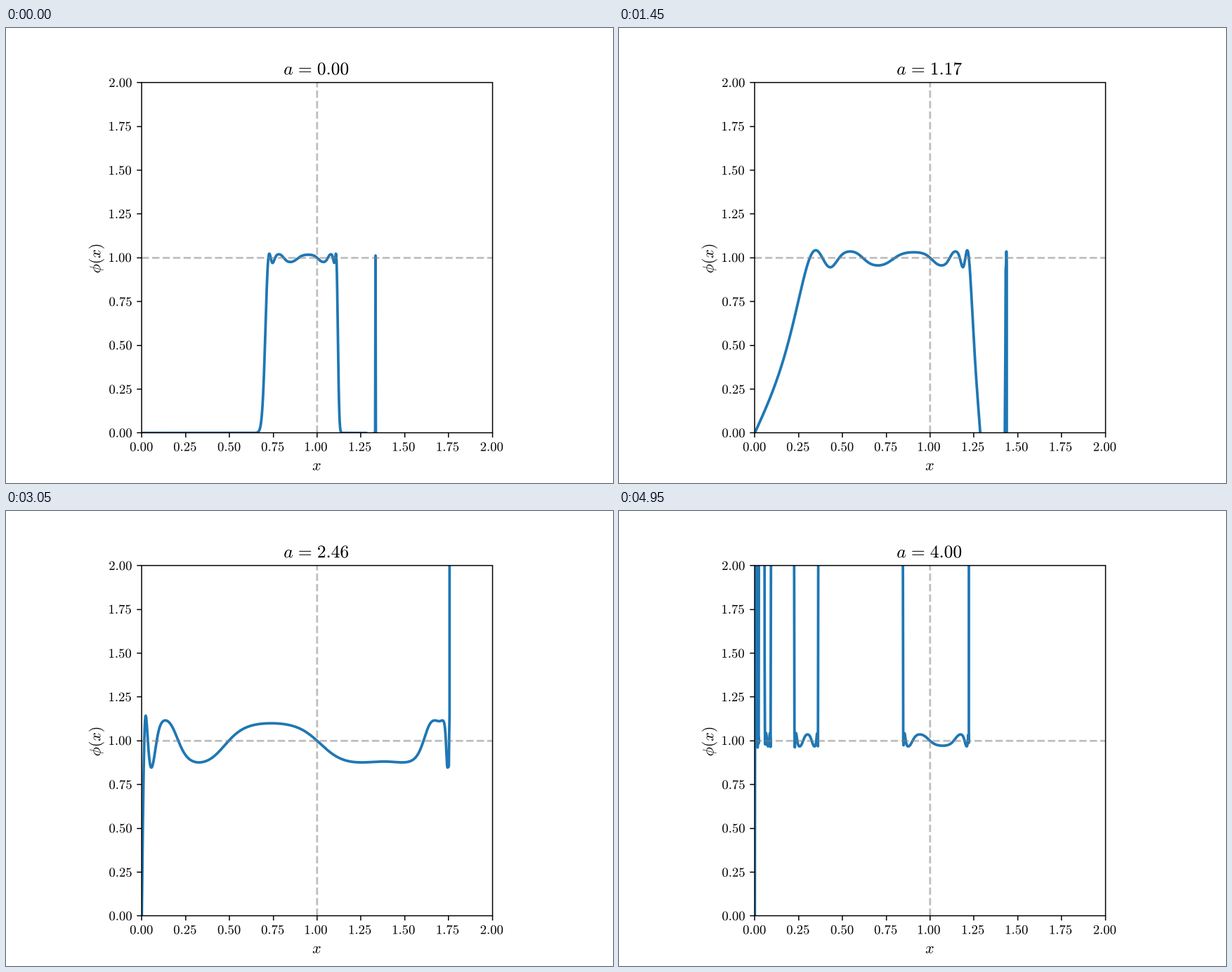
Recreate the animation shown at these times as a matplotlib script. Size 864 by 648 pixels, loop 5000 ms.

```python
import numpy as np
import matplotlib.pyplot as plt
from matplotlib.animation import FuncAnimation
from matplotlib.patches import PathPatch, Rectangle
from matplotlib.textpath import TextPath
from matplotlib.transforms import Affine2D

W, H, DPI = 864, 648, 135
FRAMES, INTERVAL = 100, 50
STEPS = 5            # how often the quintic is applied
SLOPE_AT_ONE = -0.98

# Plot box in pixels, y upwards
LEFT, BOTTOM, SIDE = 193.32, 71.28, 498.96
MID_X, MID_Y = LEFT + SIDE / 2, BOTTOM + SIDE / 2
GRID = DPI / 200     # lines and text sit on a 200 dpi grid
TEX_PT = DPI / 72.27

plt.rcParams["mathtext.fontset"] = "cm"


def phi(x, a):
    """Iterate a*x + b*x^3 + c*x^5 with a fixed point and fixed slope at 1."""
    c = (SLOPE_AT_ONE + 2 * a - 3) / 2
    b = 1 - a - c
    with np.errstate(all="ignore"):
        for _ in range(STEPS):
            y = x * x
            x = x * (a + b * y + c * y * y)
    return np.where(np.isfinite(x), np.clip(x, -1e6, 1e6), np.nan)


def snap(v):
    return np.floor(np.asarray(v) / GRID + 0.5) * GRID


def text_path(x, y, text, size, angle=0):
    """Outline of math text whose ink starts at (x, y)."""
    path = TextPath((0, 0), f"${text}$", size=size * TEX_PT)
    ink = path.get_extents()
    place = Affine2D().translate(-ink.x0, -ink.y0).rotate_deg(angle)
    return path.transformed(place.translate(snap(x), snap(y)))


def title_path(a):
    text = rf"a\hspace{{0.116}}=\hspace{{0.116}}{a:.2f}"
    return text_path(MID_X - 46.5, 581.5, text, 13.68)


fig = plt.figure(figsize=(W / DPI, H / DPI), dpi=DPI, facecolor="white")
ax = fig.add_axes([LEFT / W, BOTTOM / H, SIDE / W, SIDE / H])
ax.set(xlim=(0, 2), ylim=(0, 2))
ax.axis("off")

# Overlay in pixel units for the frame, guides and text
page = fig.add_axes([0, 0, 1, 1])
page.set(xlim=(0, W), ylim=(0, H))
page.axis("off")


def line(x, y, **style):
    page.plot(x, y, snap=False, solid_capstyle="butt", **style)


def label(*args):
    patch = PathPatch(text_path(*args), fc="black", lw=0)
    return page.add_patch(patch)


x0, x1 = snap([LEFT, LEFT + SIDE])
y0, y1 = snap([BOTTOM, BOTTOM + SIDE])
page.add_patch(Rectangle((x0, y0), x1 - x0, y1 - y0, fill=False,
                         lw=0.8, snap=False, zorder=3))

guide = dict(color="gray", ls="--", lw=1.5, alpha=0.5)
line([x0, x1], [snap(MID_Y)] * 2, **guide)
line([snap(MID_X)] * 2, [y0, y1], **guide)

tick = dict(color="black", lw=0.8)
TICK_LEN, TICK_TEXT_W = 6.75, 33.2
for t in np.linspace(0, 2, 9):
    x, y = LEFT + t / 2 * SIDE, BOTTOM + t / 2 * SIDE
    line([snap(x)] * 2, [y0 - TICK_LEN, y0], **tick)
    line([x0 - TICK_LEN, x0], [snap(y)] * 2, **tick)
    label(x - TICK_TEXT_W / 2, 45.2, f"{t:.2f}", 10)
    label(180.2 - TICK_TEXT_W, y - 6.48, f"{t:.2f}", 10)

label(MID_X - 6.3, 18.5, "x", 11.8)
label(139.5, MID_Y - 21.35, r"\phi(x)", 11.75, 90)

title = PathPatch(title_path(0), fc="black", lw=0)
page.add_patch(title)

xs = np.linspace(0, 2, 1000)
curve, = ax.plot([], [], color="C0", lw=2)


def update(i):
    a = 4 * i / (FRAMES - 1)
    curve.set_data(xs, phi(xs, a))
    title.set_path(title_path(a))
    return curve, title


anim = FuncAnimation(fig, update, frames=FRAMES, interval=INTERVAL, repeat=True)
plt.show()
```
